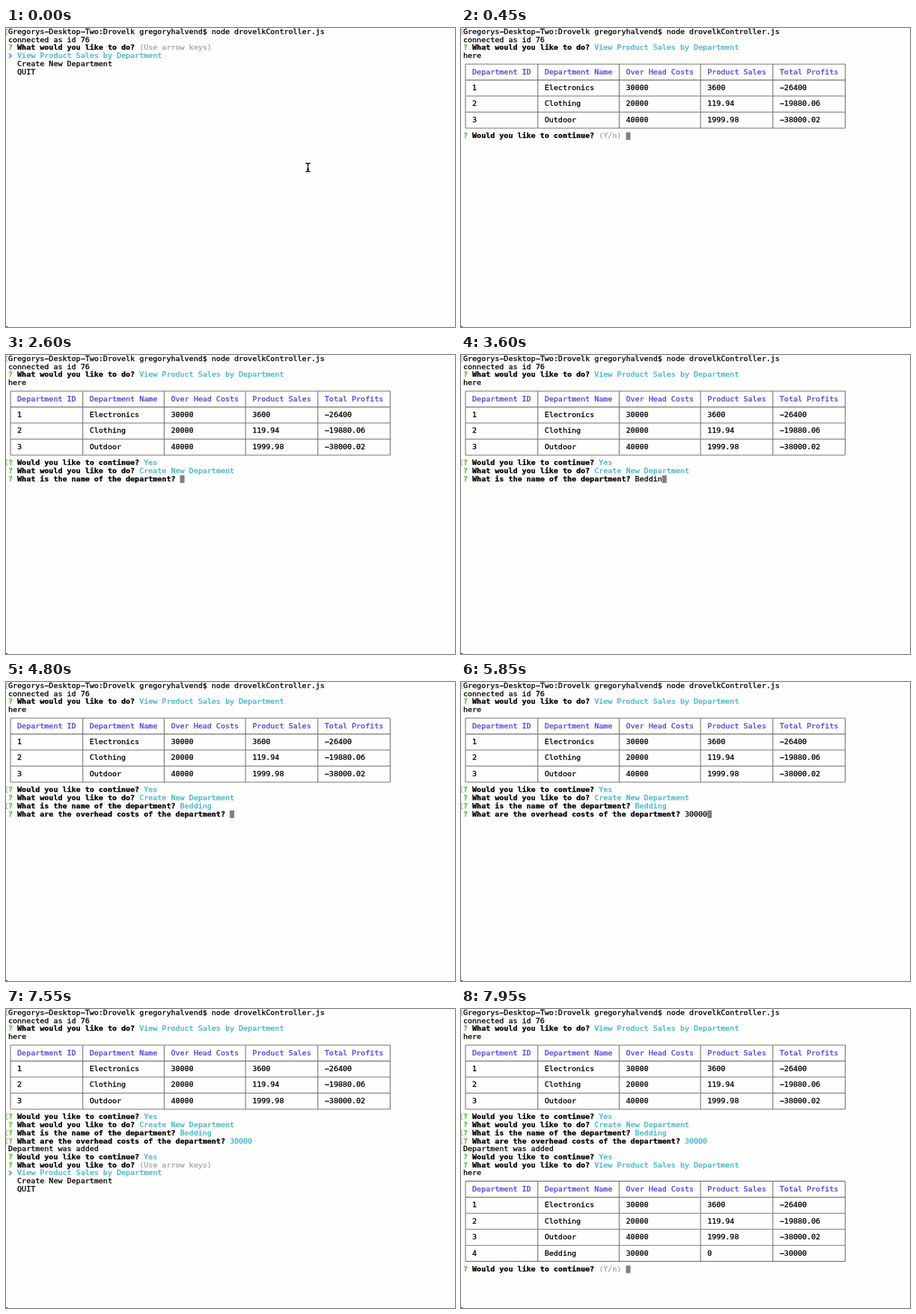
Animation, 600 px wide and 400 px high, one loop 8 s. Source, as an HTML page with a canvas:

```html
<!DOCTYPE html>
<html lang="en">
<head>
<meta charset="utf-8">
<title>Department terminal</title>
<style>
html, body { margin: 0; width: 100%; height: 100%; overflow: hidden; background: #fefefd; }
canvas { display: block; }
</style>
</head>
<body>
<canvas id="stage" width="600" height="400"></canvas>
<script>
const ctx = document.getElementById('stage').getContext('2d');
const LOOP = 8000, CELL = 6.04, PITCH = 10.72, LEFT = 3;
const INK = '#000', TEAL = '#3cb2c4', GREEN = '#4fbe3a', GREY = '#a4a4a0',
      VIOLET = '#563cdc', RULE = '#77777a', MARK = '#b4b4a8', BLOCK = '#82827a';

const DO = 'What would you like to do?';
const MORE = 'Would you like to continue?';
const NAME = 'What is the name of the department?';
const COST = 'What are the overhead costs of the department?';
const CHOICES = ['View Product Sales by Department', 'Create New Department', 'QUIT'];
const EDGES = [0, 16, 34, 52, 68, 84];
const HEADS = ['Department ID', 'Department Name', 'Over Head Costs', 'Product Sales', 'Total Profits'];
const ROWS = [
  ['1', 'Electronics', '30000', '3600', '−26400'],
  ['2', 'Clothing', '20000', '119.94', '−19880.06'],
  ['3', 'Outdoor', '40000', '1999.98', '−38000.02'],
  ['4', 'Bedding', '30000', '0', '−30000']
];

let row, col;

function put(text, color = INK, bold = false) {
  ctx.font = `${bold ? 'bold ' : ''}10.03px "DejaVu Sans Mono", monospace`;
  ctx.fillStyle = ctx.strokeStyle = color;
  ctx.lineWidth = 0.3;
  ctx.save();
  ctx.translate(LEFT, row * PITCH + 8);
  ctx.scale(1, 0.9);
  for (const ch of text) {
    const x = col++ * CELL;
    ctx.fillText(ch, x, 0);
    ctx.strokeText(ch, x, 0);
  }
  ctx.restore();
}

function newline() {
  row++;
  col = 0;
}

function say(text) {
  put(text);
  newline();
}

function path(color, width, ...lines) {
  ctx.strokeStyle = color;
  ctx.lineWidth = width;
  ctx.beginPath();
  for (const [start, ...rest] of lines) {
    ctx.moveTo(...start);
    rest.forEach(p => ctx.lineTo(...p));
  }
  ctx.stroke();
}

function mark() {
  const y = Math.round(row * PITCH) + 0.5;
  path(MARK, 1, [[3, y + 1], [0.5, y + 1], [0.5, y + 8], [3, y + 8]]);
}

function question(text) {
  put('? ', GREEN, true);
  put(text + ' ', INK, true);
}

function answered(text, answer, marked) {
  if (marked) mark();
  question(text);
  put(answer, TEAL);
  newline();
}

function prompt(text, hint, typed = '') {
  question(text);
  put(hint, GREY);
  put(typed);
  ctx.fillStyle = BLOCK;
  ctx.fillRect(LEFT + col * CELL, row * PITCH + 0.2, CELL, 10.2);
}

function arrow() {
  const y = row * PITCH + 5;
  path(TEAL, 1.8, [[4, y - 3], [7.2, y], [4, y + 3]]);
}

function menu(picked, hint = '(Use arrow keys)') {
  question(DO);
  put(hint, GREY);
  newline();
  CHOICES.forEach((choice, i) => {
    const on = i === picked;
    if (on) arrow();
    put('  ' + choice, on ? TEAL : INK);
    newline();
  });
}

function table(count) {
  const mid = r => r * PITCH + 5.3;
  const xs = EDGES.map(c => LEFT + (c + 0.5) * CELL);
  const top = row, bottom = row + 2 * count + 2;
  for (let r = top; r <= bottom; r += 2) path(RULE, 1.1, [[xs[0], mid(r)], [xs[5], mid(r)]]);
  xs.forEach(x => path(RULE, 1.1, [[x, mid(top)], [x, mid(bottom)]]));
  [HEADS, ...ROWS.slice(0, count)].forEach((cells, i) => {
    row = top + 2 * i + 1;
    cells.forEach((cell, c) => {
      col = EDGES[c] + 2;
      put(cell, i ? INK : VIOLET);
    });
  });
  row = bottom;
  newline();
}

function pointer(x, y) {
  path(INK, 1.3,
    [[x - 3, y - 5.5], [x - 1, y - 5.5], [x, y - 4.5], [x, y + 4.5], [x - 1, y + 5.5], [x - 3, y + 5.5]],
    [[x + 3, y - 5.5], [x + 1, y - 5.5], [x, y - 4.5]],
    [[x + 3, y + 5.5], [x + 1, y + 5.5], [x, y + 4.5]],
    [[x - 1.5, y + 2.5], [x + 1.5, y + 2.5]]);
}

const typing = (text, t, start, step) => text.slice(0, Math.max(0, Math.floor((t - start) / step) + 1));

function session(t) {
  mark();
  say('Gregorys−Desktop−Two:Drovelk gregoryhalvend$ node drovelkController.js');
  say('connected as id 76');
  if (t < 300) {
    menu(0);
    return pointer(403.5, 186.5);
  }
  answered(DO, CHOICES[0]);
  say('here');
  table(3);
  if (t < 1150) return prompt(MORE, '(Y/n) ', typing('y', t, 950, 50));
  answered(MORE, 'Yes', true);
  if (t < 1950) return menu(0);
  if (t < 2350) return menu(1, '');
  answered(DO, CHOICES[1]);
  if (t < 4050) return prompt(NAME, '', typing('Bedding', t, 2800, 150));
  answered(NAME, 'Bedding', true);
  if (t < 5950) return prompt(COST, '', typing('30000', t, 5000, 150));
  answered(COST, '30000', true);
  say('Department was added');
  if (t < 7100) return prompt(MORE, '(Y/n) ');
  answered(MORE, 'Yes');
  if (t < 7650) return menu(0);
  answered(DO, CHOICES[0]);
  say('here');
  table(4);
  prompt(MORE, '(Y/n) ');
}

function draw() {
  ctx.fillStyle = '#fefefd';
  ctx.fillRect(0, 0, 600, 400);
  ctx.fillStyle = '#33332a';
  ctx.fillRect(0, 399, 2, 1);
  row = col = 0;
  session(performance.now() % LOOP);
  requestAnimationFrame(draw);
}

draw();
</script>
</body>
</html>
```
